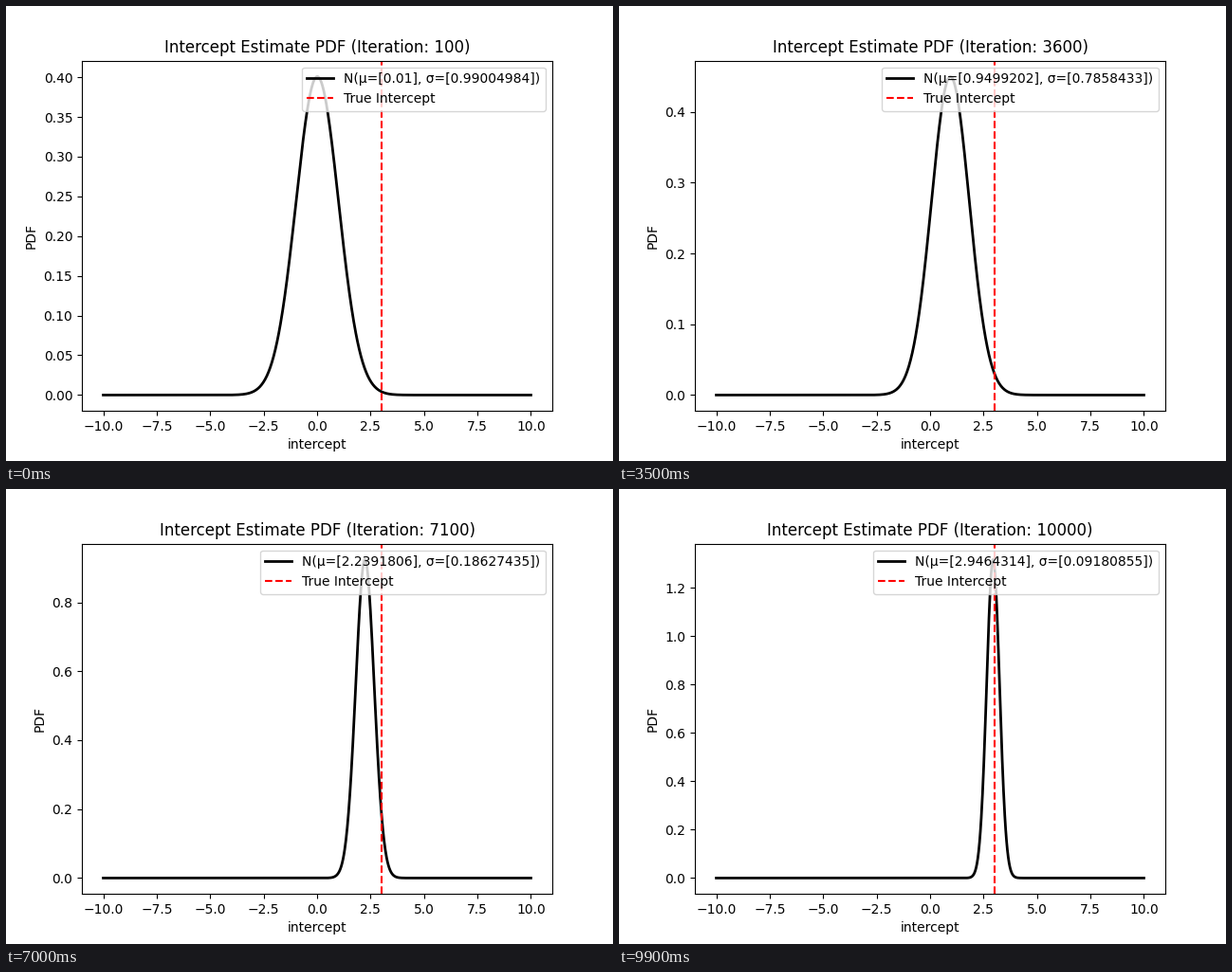
A matplotlib script that plays this animation: 640 px wide and 480 px high, repeating every 10000 ms.

```python
import numpy as np
import matplotlib.pyplot as plt
from matplotlib.animation import FuncAnimation

FRAMES = 100
STEP_MS = 100
TRUE_INTERCEPT = 3


def monotone_cubic(xk, yk, x):
    """Shape-preserving cubic Hermite interpolation."""
    xk, yk = np.asarray(xk, float), np.asarray(yk, float)
    h, d = np.diff(xk), np.diff(yk) / np.diff(xk)
    m = np.empty_like(yk)
    w1, w2 = 2 * h[1:] + h[:-1], h[1:] + 2 * h[:-1]
    m[1:-1] = (w1 + w2) / (w1 / d[:-1] + w2 / d[1:])

    def end_slope(h0, h1, d0, d1):
        s = ((2 * h0 + h1) * d0 - h0 * d1) / (h0 + h1)
        return s if s * d0 > 0 else 0.0

    m[0] = end_slope(h[0], h[1], d[0], d[1])
    m[-1] = end_slope(h[-1], h[-2], d[-1], d[-2])

    i = np.clip(np.searchsorted(xk, x, side="right") - 1, 0, len(h) - 1)
    t = (x - xk[i]) / h[i]
    return ((1 + 2 * t) * (1 - t) ** 2 * yk[i] + t * (1 - t) ** 2 * h[i] * m[i]
            + t * t * (3 - 2 * t) * yk[i + 1] + t * t * (t - 1) * h[i] * m[i + 1])


steps = np.arange(FRAMES)
means = monotone_cubic(
    [0, 19, 35, 58, 70, 88, 99],
    [0.01, 0.7557903, 0.9499202, 1.4776648, 2.2391806, 2.8245986, 2.9464314],
    steps).astype(np.float32)
variances = np.exp(monotone_cubic(
    [0, 19, 22, 35, 58, 70, 88, 99],
    np.log([0.99004984, 0.96497923, 0.9434127, 0.7858433,
            0.26355106, 0.18627435, 0.10833611, 0.09180855]),
    steps)).astype(np.float32)

x = np.linspace(-10, 10, 1000)
fig, ax = plt.subplots(figsize=(6.4, 4.8), dpi=100)


def draw(k):
    mu, var = means[k:k + 1], variances[k:k + 1]
    pdf = np.exp(-(x - mu) ** 2 / (2 * var)) / np.sqrt(2 * np.pi * var)
    ax.clear()
    ax.plot(x, pdf, "k", lw=2, label=f"N(μ={mu}, σ={var})")
    ax.axvline(TRUE_INTERCEPT, color="r", ls="--", label="True Intercept")
    ax.set_title(f"Intercept Estimate PDF (Iteration: {100 * (k + 1)})")
    ax.set_xlabel("intercept")
    ax.set_ylabel("PDF")
    ax.legend(loc="upper right")


anim = FuncAnimation(fig, draw, frames=FRAMES, init_func=lambda: draw(0),
                     interval=STEP_MS, repeat=True, repeat_delay=0)
plt.show()
```
